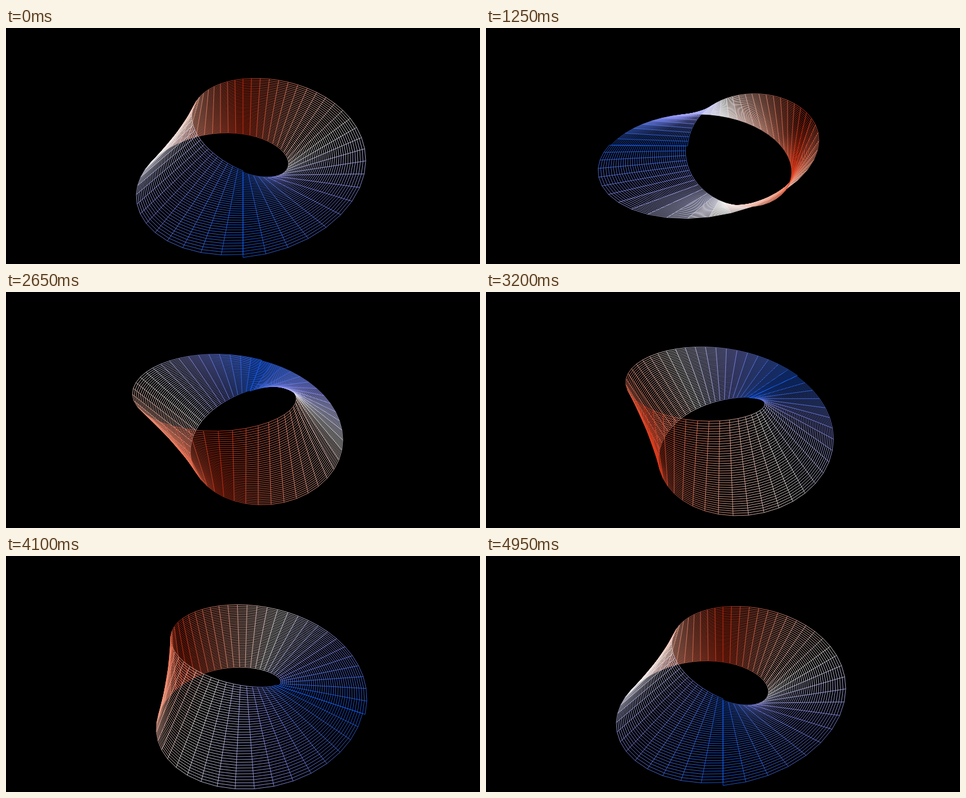
An HTML page with a canvas that plays this animation: 800 px wide and 400 px high, repeating every 5 s.

```html
<!DOCTYPE html>
<html lang="en">
<head>
<meta charset="utf-8">
<title>Rotating Möbius strip</title>
<style>
  html, body { margin: 0; width: 100%; height: 100%; overflow: hidden; background: #000; }
  canvas { display: block; width: 800px; height: 400px; }
</style>
</head>
<body>
<canvas id="stage" width="800" height="400"></canvas>
<script>
const ctx = document.getElementById('stage').getContext('2d');

const STEP_MS = 50, STEPS = 100;
const RADIUS = 126.5, HALF = 66.5;      // ring radius, half the strip width
const NU = 50, NV = 40;                 // cells around and across
const CX = 400, CY = 200.5, DIST = 412; // view centre and camera distance
const TILT = 38 * Math.PI / 180;
const SIN = Math.sin(TILT), COS = Math.cos(TILT);
const TAU = 2 * Math.PI;

// blue at the seam, white at the quarter turns, red on the far side
const STOPS = [[25, 95, 240], [140, 146, 248], [248, 246, 248], [242, 152, 126], [226, 52, 20]];

function tint(u) {
  const p = (1 - Math.abs(u / Math.PI - 1)) * (STOPS.length - 1);
  const i = Math.min(STOPS.length - 2, Math.max(0, Math.floor(p)));
  const rgb = STOPS[i].map((c, n) => Math.round(c + (STOPS[i + 1][n] - c) * (p - i)));
  return `rgb(${rgb})`;
}

function project(u, v, turn) {
  const r = RADIUS + v * Math.cos(u / 2);
  const z = v * Math.sin(u / 2);
  const x = r * Math.sin(u - turn);
  const near = r * Math.cos(u - turn);
  const k = 1 / (1 - (z * SIN + near * COS) / DIST);
  return [CX + x * k, CY - (z * COS - near * SIN) * k];
}

// The strip lacks its first row, which leaves a small notch at the seam.
function rib(u, turn) {
  return Array.from({ length: NV }, (_, j) =>
    project(u, HALF * (2 * (j + 1) / NV - 1), turn));
}

function draw(step) {
  const turn = TAU * step / (STEPS - 1);
  ctx.fillStyle = '#000';
  ctx.fillRect(0, 0, 800, 400);
  ctx.lineWidth = 0.8;

  let prev = null;
  for (let i = 0; i <= NU; i++) {
    const u = TAU * i / NU;
    const row = rib(u, turn);
    if (prev) {
      ctx.strokeStyle = tint(u - Math.PI / NU);
      ctx.beginPath();
      row.forEach((p, j) => {
        ctx.moveTo(...prev[j]);
        ctx.lineTo(...p);
      });
      ctx.stroke();
    }
    ctx.strokeStyle = tint(u);
    ctx.beginPath();
    row.forEach(p => ctx.lineTo(...p));
    ctx.stroke();
    prev = row;
  }
}

let start = null, shown = -1;
function tick(now) {
  if (start === null) start = now;
  const step = Math.floor((now - start) / STEP_MS) % STEPS;
  if (step !== shown) draw(shown = step);
  requestAnimationFrame(tick);
}
draw(0);
requestAnimationFrame(tick);
</script>
</body>
</html>
```
